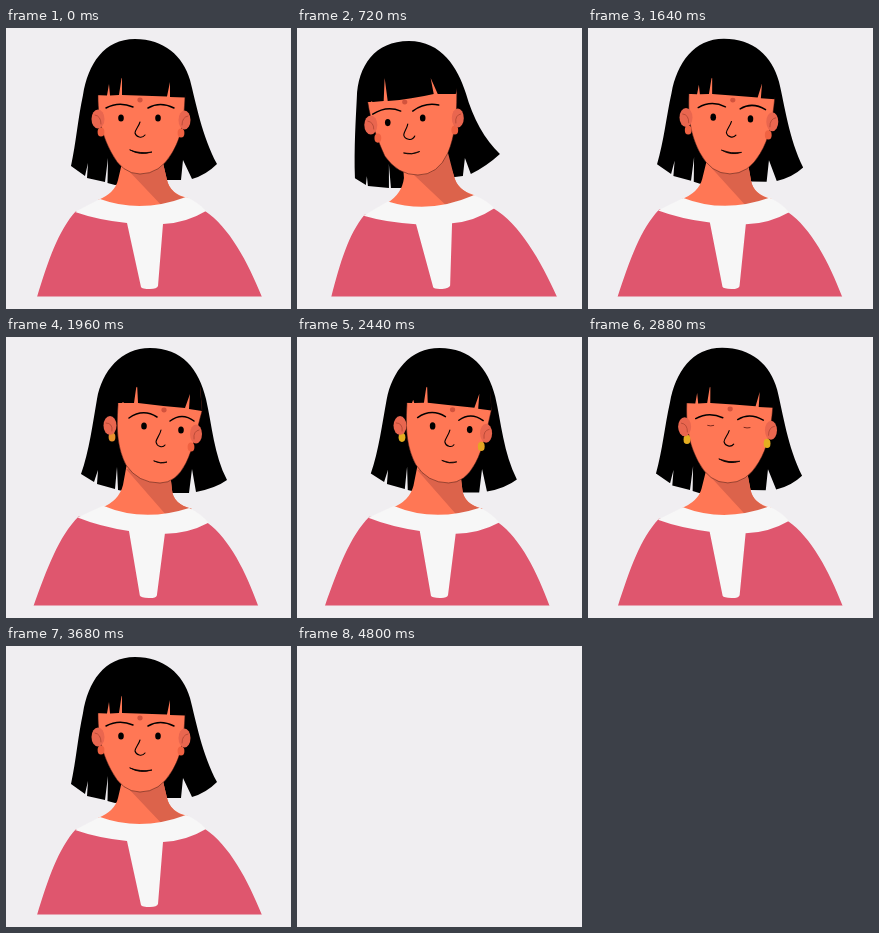
An HTML page for the animation above (4.84 s loop, 285 px wide and 281 px high).

```html
<!DOCTYPE html>
<html lang="en">
<head>
<meta charset="utf-8">
<title>Portrait</title>
<style>
html, body { margin: 0; width: 100%; height: 100%; overflow: hidden; background: #f0eef1; }
svg { display: block; width: 100vw; height: 100vh; }
</style>
</head>
<body>
<svg id="stage" viewBox="0 0 285 281">
  <defs><clipPath id="cut"><rect width="285" height="268.5"/></clipPath></defs>
  <g id="woman">
    <g id="head"></g>
    <g clip-path="url(#cut)">
      <g id="body">
        <path fill="#df566e" d="M27 282C40 240 50 205 70 183L199 183C226 201 246 242 261 282Z"/>
        <path fill="#f7f7f7" d="M69 184Q82 177 94 171Q135 186 180 169Q192 174 200 183Q180 195 157 196L152 258Q151 261 144 261Q136 261 135 259L121 195Q92 192 69 184Z"/>
      </g>
    </g>
  </g>
</svg>
<script>
const LOOP = 4840, STEP = 40, BLANK = 4800;
const SKIN = '#ff7755', SHADE = '#dc634b', EAR = '#e9664f', INK = '#000';
const $ = id => document.getElementById(id);

// Head swing: -1 leans left, 0 is upright, 1 leans right.
const SWING = [[0, 0], [520, -1.1], [720, -1.01], [1120, -.98], [1280, -.91], [1680, .55],
  [1960, 1], [2240, 1], [2800, .45], [2880, .33], [3240, -.4], [3680, 0]];

function swing(t) {
  const k = SWING, n = k.length - 1;
  if (t >= k[n][0]) return k[n][1];
  let i = 0;
  while (t >= k[i + 1][0]) i++;
  const slope = j => {
    if (j === 0 || j === n) return 0;
    const a = (k[j][1] - k[j - 1][1]) / (k[j][0] - k[j - 1][0]);
    const b = (k[j + 1][1] - k[j][1]) / (k[j + 1][0] - k[j][0]);
    return a * b <= 0 ? 0 : 2 * a * b / (a + b);
  };
  const [t0, a] = k[i], [t1, b] = k[i + 1], d = t1 - t0, s = (t - t0) / d;
  const s2 = s * s, s3 = s2 * s;
  return (2 * s3 - 3 * s2 + 1) * a + (s3 - 2 * s2 + s) * d * slope(i)
    + (3 * s2 - 2 * s3) * b + (s3 - s2) * d * slope(i + 1);
}

// Each shape has three poses: left, upright, right.
const parts = [];
function add(tag, attrs) {
  const el = document.createElementNS('http://www.w3.org/2000/svg', tag);
  for (const k in attrs) el.setAttribute(k, attrs[k]);
  $('head').append(el);
  return el;
}
const numbers = s => s.match(/-?[\d.]+/g).map(Number);
function shape(attrs, ...poses) {
  const el = add('path', attrs), words = poses[1].split(/-?[\d.]+/);
  parts.push({ el, words, poses: poses.map(numbers) });
  return el;
}
function dot(attrs, ...poses) {
  const el = add('ellipse', attrs);
  parts.push({ el, poses: poses.map(numbers) });
  return el;
}
const line = (w, color = INK) => ({ fill: 'none', stroke: color, 'stroke-width': w, 'stroke-linecap': 'round', 'stroke-linejoin': 'round' });

// Hair behind the face
shape({ fill: INK },
  'M58 150C57 120 59 90 60 70C61 38 78 13 112 13C145 13 161 40 169 65C176 90 188 112 203 126Q190 138 174 146L168 130L166 148L150 150L106 160L94 160L92 136L92 160L71 158L70 148L69 157Z',
  'M65 138C70 115 72 90 77 67C82 36 98 11 129 11C158 11 177 28 184 52C190 75 196 108 211 136Q200 147 186 151L177 132L175 152L160 152L109 157L101.5 155L102 130L99 154L81 150L82 135L79 148Z',
  'M75 137C83 115 87 85 91 62C96 34 115 11 144 11C176 11 193 32 200 62C206 88 208 118 221 143Q210 151 190 155L186 132L183 156L165 156L117 154L112 153L111 130L109 152L91 147L92 133L88 145Z');
// Neck and its shadow
shape({ fill: SKIN },
  'M106 135L107 150Q105 166 90 175L130 190L177 167Q160 162 157 148L150 128Z',
  'M116 135L112 152Q109 165 92 172L135 190L182 170Q164 166 161 152L157 135Z',
  'M121 126L117 148Q113 164 95 171L137 190L186 172Q167 167 166 153L164 135Z');
shape({ fill: SHADE },
  'M116 146L152 180L178 168Q160 162 157 148L151 125L130 130Z',
  'M121 141L158 180L182 171Q164 166 161 152L157 135L140 130Z',
  'M120 132L161 179L186 172Q167 167 166 153L164 135L145 130Z');
// Face
shape({ fill: SKIN, stroke: '#3a1510', 'stroke-width': .5 },
  'M74 50L71 74C74 95 82 115 88 128Q101 147 121 147Q141 147 151 125C158 108 160 90 160 66L158 50Z',
  'M93 50L92 68C92 95 98 110 105 124Q116 146 134 146Q154 146 166 125C175 110 178 95 179 68L178 50Z',
  'M112 50L112 68C110 95 112 112 120 128Q132 146 154 146Q170 146 180 126C187 112 191 92 196 74L194 50Z');
// Ears and earrings
const rings = [
  dot({ rx: 3.4, ry: 4.6 }, '81 110', '95 104', '106 100'),
  dot({ rx: 3.4, ry: 4.6 }, '158 102', '175 105', '185 110')];
dot({ fill: EAR, rx: 6.5, ry: 9.5 }, '74 97', '92 91', '104 88.5');
dot({ fill: EAR, rx: 6, ry: 9.5 }, '161 90', '178.5 92', '190 97');
shape(line(.6, '#9c3c2a'), 'M71 93Q77 94 77 101', 'M89 87Q95 88 95 96', 'M100 86Q107 86 106 94');
shape(line(.6, '#9c3c2a'), 'M164 86Q158 87 159 95', 'M182 88Q176 89 176 97', 'M193 93Q187 94 188 102');
// Features
dot({ fill: '#d2533d', rx: 2.6, ry: 2.4 }, '108 74', '134 72', '158 73');
const brows = [
  shape(line(1.5), 'M76 86Q90 77 104 83', 'M100 80Q113 73 127 79', 'M123 81Q137 71 151 80'),
  shape(line(1.5), 'M116 83Q128 74 142 77', 'M142 80Q154 73 168 80', 'M164 84Q176 75 188 84')];
const eyes = [
  dot({ fill: INK }, '91 94.5', '115 90', '138 89'),
  dot({ fill: INK }, '126 90', '152 90', '175 93')];
const lids = [
  shape(line(1, '#7c2a1e'), 'M88 94Q91 95 94 94', 'M112 89Q115 90 118 89', 'M135 89Q138 90 141 89'),
  shape(line(1, '#7c2a1e'), 'M123 90Q126 91 129 90', 'M148 90Q151 91 154 90', 'M172 92Q175 93 178 93')];
shape(line(1.1), 'M111 96C110 101 107 104 107 107C108 111 115 114 118 108',
  'M134 94C133 98 129 102 129 105C130 109 136 111 139 107',
  'M155 93C154 98 150 102 150 105C151 110 157 111 159 108');
shape({ ...line(.8), fill: INK },
  'M107 125Q115 127.5 123 123.5Q115 127 107 125Z',
  'M124 122Q134 128 146 124Q134 126 124 122Z',
  'M148 124Q155 127.5 161 125Q155 127 148 124Z');
// Fringe
shape({ fill: INK },
  'M68 74L74 74L75 73L76 74L87 73L88 50L91 73Q115 71 137 66L134 50L141 66L159 66L162 50Q145 25 110 27Q72 30 70 55Z',
  'M88 67L101 67.5L103 56L104 67.5L113 67L116 47L116 67Q140 67.5 161 68.5L164 54L164 69L179 69.5L182 50Q165 25 130 25Q95 25 90 50Z',
  'M108 66L116 66L117 65L118 66L128 66L131 45L132 66Q155 69 179 71L184 57L183 72L196 74L194 50Q180 25 145 25Q108 27 107 50Z');

const ramp = (t, a, b) => Math.max(0, Math.min(1, (t - a) / (b - a)));
const blend = (a, b, k) => `rgb(${a.map((v, i) => Math.round(v + (b[i] - v) * k))})`;

function draw(t) {
  $('woman').style.display = t >= BLANK ? 'none' : '';
  const u = swing(t);
  const w = [u * (u - 1) / 2, 1 - u * u, u * (u + 1) / 2];
  for (const { el, words, poses } of parts) {
    const v = poses[1].map((_, i) => (w[0] * poses[0][i] + w[1] * poses[1][i] + w[2] * poses[2][i]).toFixed(2));
    if (words) el.setAttribute('d', words.map((s, i) => s + (v[i] ?? '')).join(''));
    else { el.setAttribute('cx', v[0]); el.setAttribute('cy', v[1]); }
  }
  $('body').setAttribute('transform', `rotate(${(2.8 * u).toFixed(3)} 143 235)`);

  const shut = ramp(t, 2720, 2800) * (1 - ramp(t, 2960, 3040));
  eyes.forEach(e => {
    e.setAttribute('rx', 2.8);
    e.setAttribute('ry', 3.6 * (1 - shut));
  });
  lids.forEach(l => l.setAttribute('opacity', shut > .8 ? 1 : 0));
  brows.forEach(b => b.setAttribute('transform', `translate(0 ${2 * shut})`));

  const fade = 1 - ramp(t, 3280, 3440);
  const gold = [ramp(t, 1640, 2160), ramp(t, 2080, 2480)];
  rings.forEach((r, i) => r.setAttribute('fill', blend([240, 98, 66], [228, 174, 32], gold[i] * fade)));
}

let start;
function tick(now) {
  start ??= now;
  draw(Math.floor((now - start) % LOOP / STEP) * STEP);
  requestAnimationFrame(tick);
}
draw(0);
requestAnimationFrame(tick);
</script>
</body>
</html>
```
